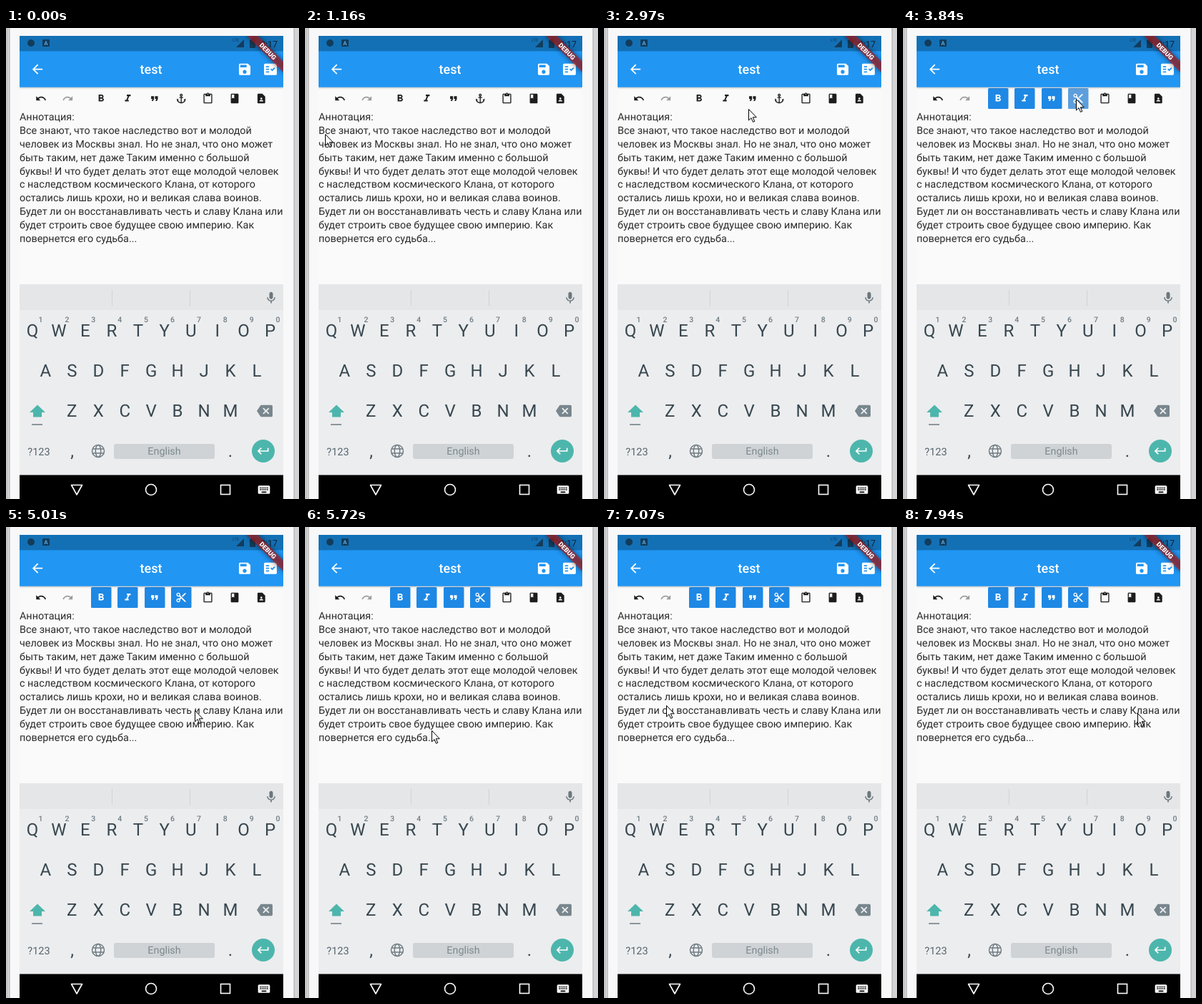
An HTML page that plays this animation: 410 px wide and 658 px high, repeating every 8 s.

```html
<!DOCTYPE html>
<html lang="ru">
<head>
<meta charset="utf-8">
<title>Editor</title>
<style>
html, body { margin: 0; width: 100%; height: 100%; overflow: hidden; background: #f4f4f5 }
svg { display: block; font-family: Roboto, sans-serif; text-rendering: geometricPrecision }
.mid { text-anchor: middle }
.soft { filter: blur(3.5px) }
.bar { filter: drop-shadow(0 1px 1px rgba(0, 0, 0, .25)) }
</style>
</head>
<body>
<svg id="stage" width="410" height="658" viewBox="0 0 410 658"></svg>
<script>
const PATHS = {
  undo: 'M12.5 8c-2.65 0-5.05.99-6.9 2.6L2 7v9h9l-3.62-3.62c1.39-1.16 3.16-1.88 5.12-1.88 3.54 0 6.55 2.31 7.6 5.5l2.37-.78C21.08 11.03 17.15 8 12.5 8z',
  redo: 'M18.4 10.6C16.55 8.99 14.15 8 11.5 8c-4.65 0-8.58 3.03-9.96 7.22L3.9 16c1.05-3.19 4.05-5.5 7.6-5.5 1.95 0 3.73.72 5.12 1.88L13 16h9V7l-3.6 3.6z',
  bold: 'M15.6 10.79c.97-.67 1.65-1.77 1.65-2.79 0-2.26-1.75-4-4-4H7v14h7.04c2.09 0 3.71-1.7 3.71-3.79 0-1.52-.86-2.82-2.15-3.42zM10 6.5h3c.83 0 1.5.67 1.5 1.5s-.67 1.5-1.5 1.5h-3v-3zm3.5 9H10v-3h3.5c.83 0 1.5.67 1.5 1.5s-.67 1.5-1.5 1.5z',
  italic: 'M10 4v3h2.21l-3.42 8H6v3h8v-3h-2.21l3.42-8H18V4z',
  quote: 'M6 17h3l2-4V7H5v6h3zm8 0h3l2-4V7h-6v6h3z',
  anchor: 'M17 15l1.55 1.55c-.96 1.69-3.33 3.04-5.55 3.37V11h3V9h-3V7.82C14.16 7.4 15 6.3 15 5c0-1.65-1.35-3-3-3S9 3.35 9 5c0 1.3.84 2.4 2 2.82V9H8v2h3v8.92c-2.22-.33-4.59-1.68-5.55-3.37L7 15l-4-3v3c0 3.88 4.92 7 9 7s9-3.12 9-7v-3l-4 3zM12 4c.55 0 1 .45 1 1s-.45 1-1 1-1-.45-1-1 .45-1 1-1z',
  cut: 'M9.64 7.64c.23-.5.36-1.05.36-1.64 0-2.21-1.79-4-4-4S2 3.79 2 6s1.79 4 4 4c.59 0 1.14-.13 1.64-.36L10 12l-2.36 2.36C7.14 14.13 6.59 14 6 14c-2.21 0-4 1.79-4 4s1.79 4 4 4 4-1.79 4-4c0-.59-.13-1.14-.36-1.64L12 14l7 7h3v-1L9.64 7.64zM6 8c-1.1 0-2-.89-2-2s.9-2 2-2 2 .89 2 2-.9 2-2 2zm0 12c-1.1 0-2-.89-2-2s.9-2 2-2 2 .89 2 2-.9 2-2 2zM19 3l-6 6 2 2 7-7V3z',
  paste: 'M19 2h-4.18C14.4.84 13.3 0 12 0c-1.3 0-2.4.84-2.82 2H5c-1.1 0-2 .9-2 2v16c0 1.1.9 2 2 2h14c1.1 0 2-.9 2-2V4c0-1.1-.9-2-2-2zm-7 0c.55 0 1 .45 1 1s-.45 1-1 1-1-.45-1-1 .45-1 1-1zm7 18H5V4h2v3h10V4h2v16z',
  book: 'M18 2H6c-1.1 0-2 .9-2 2v16c0 1.1.9 2 2 2h12c1.1 0 2-.9 2-2V4c0-1.1-.9-2-2-2zM6 4h5v8l-2.5-1.5L6 12V4z',
  contact: 'M14 2H6c-1.1 0-2 .9-2 2v16c0 1.1.9 2 2 2h12c1.1 0 2-.9 2-2V8l-6-6zm-2 8c1.1 0 2 .9 2 2s-.9 2-2 2-2-.9-2-2 .9-2 2-2zm4 8H8v-.57c0-.81.48-1.53 1.22-1.85.85-.37 1.79-.58 2.78-.58s1.93.21 2.78.58c.74.32 1.22 1.04 1.22 1.85V18z',
  back: 'M20 11H7.83l5.59-5.59L12 4l-8 8 8 8 1.41-1.41L7.83 13H20v-2z',
  save: 'M17 3H5c-1.11 0-2 .9-2 2v14c0 1.1.89 2 2 2h14c1.1 0 2-.9 2-2V7l-4-4zm-5 16c-1.66 0-3-1.34-3-3s1.34-3 3-3 3 1.34 3 3-1.34 3-3 3zm3-10H5V5h10v4z',
  check: 'M20 3H4c-1.1 0-2 .9-2 2v14c0 1.1.9 2 2 2h16c1.1 0 2-.9 2-2V5c0-1.1-.9-2-2-2zM10 17H5v-2h5v2zm0-4H5v-2h5v2zm0-4H5V7h5v2zm4.82 6L12 12.16l1.41-1.41 1.41 1.42L17.99 9l1.42 1.42L14.82 15z',
  mic: 'M12 14c1.66 0 3-1.34 3-3V5c0-1.66-1.34-3-3-3S9 3.34 9 5v6c0 1.66 1.34 3 3 3zm5.3-3c0 3-2.54 5.1-5.3 5.1S6.7 14 6.7 11H5c0 3.41 2.72 6.23 6 6.72V21h2v-3.28c3.28-.48 6-3.3 6-6.72h-1.7z',
  erase: 'M22 3H7c-.69 0-1.23.35-1.59.88L0 12l5.41 8.11c.36.53.9.89 1.59.89h15c1.1 0 2-.9 2-2V5c0-1.1-.9-2-2-2zm-3 12.59L17.59 17 14 13.41 10.41 17 9 15.59 12.59 12 9 8.41 10.41 7 14 10.59 17.59 7 19 8.41 15.41 12 19 15.59z',
  enter: 'M19 7v4H5.83l3.58-3.59L8 6l-6 6 6 6 1.41-1.41L5.83 13H21V7z',
  keyboard: 'M20 5H4c-1.1 0-2 .9-2 2v10c0 1.1.9 2 2 2h16c1.1 0 2-.9 2-2V7c0-1.1-.9-2-2-2zm-9 3h2v2h-2V8zm0 3h2v2h-2v-2zM8 8h2v2H8V8zm0 3h2v2H8v-2zm-1 2H5v-2h2v2zm0-3H5V8h2v2zm9 7H8v-2h8v2zm0-4h-2v-2h2v2zm0-3h-2V8h2v2zm3 3h-2v-2h2v2zm0-3h-2V8h2v2z'
};
const LINES = [
  'Аннотация:',
  'Все знают, что такое наследство вот и молодой',
  'человек из Москвы знал. Но не знал, что оно может',
  'быть таким, нет даже Таким именно с большой',
  'буквы! И что будет делать этот еще молодой человек',
  'с наследством космического Клана, от которого',
  'остались лишь крохи, но и великая слава воинов.',
  'Будет ли он восстанавливать честь и славу Клана или',
  'будет строить свое будущее свою империю. Как',
  'повернется его судьба...'
];

const rect = (x, y, w, h, fill, extra = '') =>
  `<rect x="${x}" y="${y}" width="${w}" height="${h}" fill="${fill}" ${extra}/>`;
const text = (s, x, y, size, fill, extra = '') =>
  `<text x="${x}" y="${y}" font-size="${size}" fill="${fill}" ${extra}>${s}</text>`;
const icon = (name, x, y, size, fill) =>
  `<path transform="translate(${x - size / 2} ${y - size / 2}) scale(${size / 24})" d="${PATHS[name]}" fill="${fill}"/>`;
const tool = (name, x, fill = '#1d1d1d') => icon(name, x, 98.5, 16.2, fill);
const formatX = i => 133 + i * 37.4;
const keys = (row, x, y) => [...row].map((c, i) => text(c, x + i * 36.95, y, 24, '#37474f', 'class="mid"')).join('');

const frame =
  rect(0, 0, 410, 658, '#f8f8f9') +
  rect(0, 0, 6, 658, '#d3d3d6') + rect(1, 0, 1, 658, '#b4b4b7') + rect(4, 0, 1, 658, '#bcbcbf') +
  rect(402, 0, 8, 658, '#d3d3d6') + rect(403, 0, 1, 658, '#bcbcbf');

const header =
  rect(19, 32, 369, 50.7, '#2196f3', 'class="bar"') + rect(19, 11, 369, 21.4, '#1470b5') +
  '<circle cx="35" cy="21" r="5" fill="#123c5c"/>' +
  rect(51, 16, 10, 10, '#123c5c', 'rx="1"') + text('A', 56, 24, 8, '#5aa2d8', 'class="mid" font-weight="700"') +
  text('LTE', 317, 19, 6, '#123c5c') + '<path d="M333 16v11h-11z" fill="#123c5c"/>' +
  '<path d="M341 17h2v-2h4v2h2v11h-8z" fill="#123c5c"/>' +
  text('9:17', 356, 26.5, 12.5, '#10222f') +
  icon('back', 44, 57.7, 21.5, '#fff') + icon('save', 334, 57.7, 21.5, '#fff') + icon('check', 370, 57.7, 21.5, '#fff') +
  text('test', 203, 63.8, 18, '#fff', 'class="mid" font-weight="500"') +
  '<g transform="translate(388 11) rotate(45)">' +
  rect(-36, 25.1, 72, 10.8, '#000', 'opacity=".5" class="soft"') + rect(-36, 25.1, 72, 10.8, '#b71c1c', 'opacity=".63"') +
  text('DEBUG', 0, 33.7, 9.1, '#fff', 'class="mid" font-weight="900"') + '</g>';

const editor =
  rect(19, 82, 369, 276, '#fafafa') +
  tool('undo', 49) + tool('redo', 86.4, '#9d9d9d') +
  '<g id="plain">' + ['bold', 'italic', 'quote', 'anchor'].map((n, i) => tool(n, formatX(i))).join('') + '</g>' +
  '<g id="active">' + ['bold', 'italic', 'quote', 'cut'].map((n, i) =>
    rect(Math.round(formatX(i) - 14), 84, 28.5, 29, '#1e88e5', `rx="1.5" id="chip-${n}"`) +
    tool(n, formatX(i), '#fff')).join('') + '</g>' +
  '<circle id="ripple" cx="242" cy="99" fill="#000" opacity=".12"/>' +
  tool('paste', 282.5) + tool('book', 320) + tool('contact', 357.3) +
  LINES.map((s, i) => text(s, 19, 129.4 + i * 18.8, 14.36, '#2b2b2b')).join('') +
  rect(19, 116, 2, 18, '#4285f4', 'id="caret"');

const keyboard =
  rect(19, 358, 369, 267, '#ecedef') + rect(19, 358, 369, 36, '#e5e6e8') +
  rect(148, 366, 1, 22, '#d0d3d5') + rect(257, 366, 1, 22, '#d0d3d5') +
  icon('mic', 371, 377, 20, '#6b777d') +
  keys('QWERTYUIOP', 37, 431) + keys('ASDFGHJKL', 55.4, 487) + keys('ZXCVBNM', 92.3, 543.4) +
  [...'1234567890'].map((c, i) => text(c, 48.5 + i * 36.9, 411, 10.5, '#6f7c83', 'class="mid" font-weight="500"')).join('') +
  '<path d="M44 526.500l11 10.500h-5v6.500h-12v-6.500h-5z" fill="#4db6ac"/>' + rect(36, 553, 15, 2, '#8b979d') +
  icon('erase', 362, 535, 22, '#78868d') +
  text('?123', 46, 596.5, 14.5, '#56656d', 'class="mid"') +
  text(',', 92.5, 599, 24, '#37474f', 'class="mid"') + text('.', 314, 599, 24, '#37474f', 'class="mid"') +
  '<g fill="none" stroke="#6f7c83" stroke-width="1.5"><circle cx="129" cy="591" r="8.5"/><ellipse cx="129" cy="591" rx="3.7" ry="8.5"/><path d="M121 588h16M121 594h16"/></g>' +
  rect(151, 581, 141, 21, '#cfd3d6', 'rx="3"') + text('English', 221.5, 596, 14.3, '#7d898f', 'class="mid"') +
  '<circle cx="360" cy="591" r="16" fill="#4db6ac"/>' + icon('enter', 360, 591, 20, '#fff');

const navigation =
  rect(19, 624.5, 369, 34, '#000') +
  '<g fill="none" stroke="#fff" stroke-width="1.6"><path d="M91.5 638.500h15l-7.5 13.500z" stroke-linejoin="round"/><circle cx="203" cy="645" r="7.5"/><rect x="300.5" y="638.5" width="13" height="13"/></g>' +
  icon('keyboard', 361, 645, 20, '#fff');

const $ = id => document.getElementById(id);
$('stage').innerHTML =
  '<clipPath id="screen"><rect x="19" y="11" width="369" height="647"/></clipPath>' +
  frame + `<g clip-path="url(#screen)">${editor}${header}${keyboard}${navigation}</g>` +
  '<path id="pointer" d="M.5.5v15.5l3.5-3.4 2.5 5.800 2.300-1-2.500-5.600h5z" fill="#fff" stroke="#000"/>';

const LOOP = 8000, TICK = 78.9;
const STOPS = [
  [0, 320, 571], [2, 262, 480], [5, 125, 280], [8, 48, 172], [10, 31, 151], [12, 31, 151],
  [13, 28, 148], [15, 28, 147], [16, 26, 147], [17, 26, 147], [18, 24, 146], [22, 24, 146],
  [24, 9, 131], [26, 27, 146], [28, 27, 146], [36, 202, 113], [39, 228, 99], [42, 242, 99],
  [51, 242, 99], [57, 154, 180], [62, 264, 256], [65, 210, 298], [67, 218, 292], [68, 218, 292],
  [77, 95, 269], [79, 104, 273], [84, 245, 262], [89, 48, 246], [90, 48, 246], [91, 51, 246],
  [92, 51, 246], [99, 328, 260]
];
const CARET_ON = [[1, 8], [14, 20], [29, 33], [39, 45]];

function pointerAt(tick) {
  const next = STOPS.findIndex(s => s[0] >= tick);
  if (next < 0) return STOPS.at(-1).slice(1);
  if (!next) return STOPS[0].slice(1);
  const [a, b] = [STOPS[next - 1], STOPS[next]];
  const p = (tick - a[0]) / (b[0] - a[0]);
  return [1, 2].map(i => Math.round(a[i] + (b[i] - a[i]) * p));
}
const show = (id, on) => $(id).setAttribute('visibility', on ? 'visible' : 'hidden');

function draw() {
  const time = performance.now() % LOOP;
  const tick = Math.floor((time - 115) / TICK);
  show('pointer', time >= 130);
  $('pointer').setAttribute('transform', `translate(${pointerAt(tick)})`);
  show('caret', CARET_ON.some(([from, to]) => tick >= from && tick < to));
  $('caret').setAttribute('y', tick === 44 ? 135 : 116);
  show('ripple', tick >= 44 && tick < 47);
  $('ripple').setAttribute('r', tick === 44 ? 9 : 14);
  show('plain', tick < 47);
  show('active', tick >= 47);
  $('chip-cut').setAttribute('fill', tick === 47 ? '#5c9fdc' : '#1e88e5');
  requestAnimationFrame(draw);
}
draw();
</script>
</body>
</html>
```
